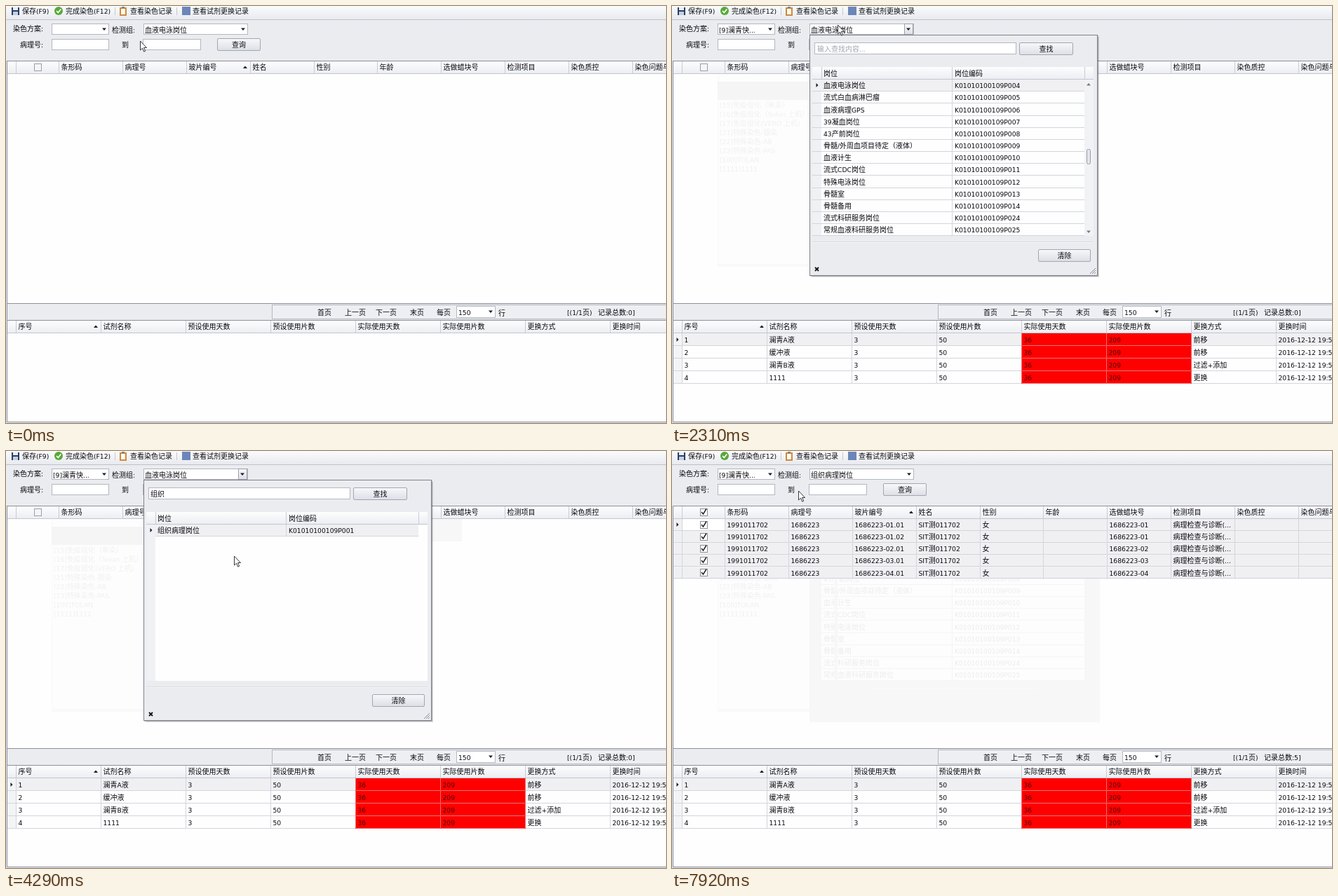
An HTML page that plays this animation: 941x595 px, repeating every 8 s.

```html
<!DOCTYPE html>
<html lang="zh-CN">
<head>
<meta charset="utf-8">
<title>染色登记</title>
<style>
html, body { margin: 0; width: 100%; height: 100%; overflow: hidden; background: #fff; }
svg { display: block; width: 941px; height: 595px; }
text { font: 10px 'Noto Sans CJK SC', 'Noto Sans CJK JP', sans-serif; fill: #08080f; white-space: pre; }
.latin { font: 9.2px 'DejaVu Sans', sans-serif; }
.ime text { font-size: 12.5px; fill: #2a4b48; }
.ime .latin { font: 12px 'Liberation Mono', monospace; }
.ime .key .latin { font: bold 12.5px 'Noto Sans', sans-serif; }
.ime .hint text { fill: #ff8212; }
.step { animation: 8000ms step-end infinite; }
</style>
</head>
<body>
<svg id="stage" viewBox="0 0 941 595">
  <defs>
    <linearGradient id="bar" x2="0" y2="1"><stop stop-color="#fafbfc"/><stop offset="1" stop-color="#e8eaef"/></linearGradient>
    <linearGradient id="head" x2="0" y2="1"><stop stop-color="#fdfdfe"/><stop offset="1" stop-color="#eceef2"/></linearGradient>
    <linearGradient id="btn" x2="0" y2="1"><stop stop-color="#f7f8fa"/><stop offset="1" stop-color="#dcdfe6"/></linearGradient>
    <linearGradient id="btnOn" x2="0" y2="1"><stop stop-color="#eaeffa"/><stop offset="1" stop-color="#c9d3ec"/></linearGradient>
    <linearGradient id="skin" x2="1" y2="0"><stop stop-color="#d3dbd0"/><stop offset=".6" stop-color="#e0e5de"/><stop offset="1" stop-color="#b9c2bb"/></linearGradient>
    <linearGradient id="mist" x2="0" y2="1"><stop stop-color="#fff" stop-opacity=".45"/><stop offset=".5" stop-color="#fff" stop-opacity=".05"/><stop offset="1" stop-color="#fff" stop-opacity=".1"/></linearGradient>
    <linearGradient id="shore" x2="1" y2="0"><stop stop-color="#6c7a73" stop-opacity="0"/><stop offset=".5" stop-color="#59665f"/><stop offset="1" stop-color="#6f7b74"/></linearGradient>
    <clipPath id="skinEdge"><rect x="211" y="71" width="448" height="58" rx="4"/></clipPath>
  </defs>
</svg>
<script>
const LOOP = 8000;
const PANEL = '#ebecef', EDGE = '#b4b7c1', DARK = '#8d909b', GRID = '#d3d5dc', TINT = '#f0f0f3', INK = '#1b1b28';
let css = '', count = 0;

const rect = (x, y, w, h, fill) => `<rect x="${x}" y="${y}" width="${w}" height="${h}" fill="${fill}"/>`;
const box = (x, y, w, h, fill, stroke = EDGE, more = '') =>
  `<rect x="${x + .5}" y="${y + .5}" width="${w - 1}" height="${h - 1}" fill="${fill}" stroke="${stroke}" ${more}/>`;
const path = (d, fill, more = '') => `<path d="${d}" fill="${fill}" ${more}/>`;
const hline = (x, y, w, c) => rect(x, y, w, 1, c);
const vline = (x, y, h, c) => rect(x, y, 1, h, c);
const text = (x, y, s, fill) => `<text x="${x}" y="${y + 3.6}"${fill ? ` style="fill:${fill}"` : ''}>` +
  s.replace(/[\x20-\x7e]+/g, m => `<tspan class="latin">${m}</tspan>`) + '</text>';
const each = (list, fn) => list.map(fn).join('');
const range = (n, from = 0) => Array.from({ length: n }, (_, i) => i + from);

const down = (x, y, c = INK) => path(`M${x - 3} ${y - 1.5}h6l-3 3.5z`, c);
const up = (x, y, c = INK) => path(`M${x - 3} ${y + 1.5}h6l-3 -3.5z`, c);
const pointer = (x, y) => path(`M${x - 1.5} ${y - 3}v6l3 -3z`, INK);
const caret = (x, y) => vline(x, y - 5, 11, '#111');
const focus = (x, w) => box(x, 26, w, 14, 'none', '#444', 'stroke-dasharray="1 1"');
const field = (x, y, w) => box(x, y, w, 16, '#fff');
const combo = (x, w) => field(x, 25, w) + down(x + w - 7, 33);
const button = (x, y, w, h, label, on) =>
  box(x, y, w, h, on ? 'url(#btnOn)' : 'url(#btn)', on ? '#44527f' : '#a3a6b1', 'rx="1.5"') +
  (on ? box(x + 2, y + 2, w - 4, h - 4, 'none', '#8f9cc4') : '') +
  text(x + w / 2 - 10, y + h / 2, label);

// Shows a part between two times of the loop.
function when(from, to, body) {
  const name = 'w' + count++, pct = t => t / LOOP * 100 + '%';
  css += `@keyframes ${name}{0%{visibility:${from ? 'hidden' : 'visible'}}${pct(from)}{visibility:visible}` +
    (to < LOOP ? `${pct(to)}{visibility:hidden}` : '') + '}';
  return `<g class="step" style="animation-name:${name}">${body}</g>`;
}

function toolbar() {
  return rect(0, 0, 941, 19, 'url(#bar)') + hline(0, 19, 941, '#bfc2cb') +
    rect(8, 2, 11, 11, '#2b3f66') + rect(10, 2, 7, 4, '#e8edf6') + rect(10, 8, 7, 5, '#c3cfe2') +
    '<circle cx="75" cy="7" r="6" fill="#58a83a"/>' + path('M72 7l2.3 2.5 4-5', 'none', 'stroke="#fff" stroke-width="1.7"') +
    rect(162, 2, 10, 12, '#d08a3c') + rect(164, 4, 6, 8, '#fbfbf6') + rect(165, 1, 4, 2, '#77808f') +
    rect(251, 1, 12, 12, '#6d86b8') +
    vline(155, 2, 11, '#c5c8d0') + vline(243, 2, 11, '#c5c8d0') +
    text(23, 7, '保存(F9)') + text(85, 7, '完成染色(F12)') + text(177, 7, '查看染色记录') + text(266, 7, '查看试剂更换记录');
}

function filters() {
  return rect(0, 20, 941, 58, PANEL) +
    text(10, 32, '染色方案:') + text(151, 34, '检测组:') + text(20, 55, '病理号:') + text(165, 55, '到') +
    combo(65, 82) + combo(196, 149) + field(65, 47, 82) + field(195, 47, 83) + button(301, 46, 62, 18, '查询') +
    when(1650, LOOP, text(67, 34, '[9]澜青快...')) + when(1650, 2310, focus(66, 66)) +
    when(0, 4950, text(198, 34, '血液电泳岗位')) + when(4950, LOOP, text(198, 34, '组织病理岗位')) +
    when(2310, 4950, box(331, 25, 13, 16, 'url(#btn)', '#9c9fab') + down(337, 33)) +
    when(4950, 5610, focus(197, 133)) +
    when(5610, 5940, caret(68, 55)) + when(5940, 6930, text(69, 55, '1686223')) + when(5940, 6600, caret(110, 55)) +
    when(6600, 7920, button(301, 46, 62, 18, '查询', true));
}

function header(y, cols, labels, sortX) {
  return rect(1, y, 940, 17, 'url(#head)') + hline(1, y + 17, 940, '#c3c6ce') +
    each(cols, x => vline(x, y, 17, '#c9ccd4')) +
    each(labels, (s, i) => text(cols[i + cols.length - labels.length] + 3.5, y + 8.5, s)) + up(sortX, y + 8.5);
}

const topCols = [14, 75, 166, 257, 348, 439, 529, 620, 711, 802, 893];
const lowCols = [14, 135, 256, 377, 498, 619, 740, 861];
const check = (x, y) => box(x - 5, y - 5, 11, 11, '#fff', '#8b8e9a') +
  path(`M${x - 3} ${y}l2.5 3 4.5 -7.5`, 'none', 'stroke="#222" stroke-width="1.5"');

function samples() {
  const ids = ['01.01', '01.02', '02.01', '03.01', '04.01'];
  return each(ids, (id, i) => {
    const y = 97 + i * 17.1, c = y + 8.5, base = '1686223';
    const cells = ['1991011702', base, base + '-' + id, 'SIT测011702', '女', '', base + '-' + id.slice(0, 2), '病理检查与诊断(...'];
    return rect(2, y, 939, 17.1, TINT) + (i ? '' : rect(15, y, 60, 16, '#fff')) + hline(2, Math.round(y + 16), 939, GRID) +
      each(topCols, x => vline(x, y, 17.1, GRID)) + check(45, Math.round(c - 1)) +
      each(cells, (s, j) => text(topCols[j + 1] + 3.5, c, s));
  }) + pointer(8, 105) + check(45, 87);
}

function reagents() {
  const rows = [['澜青A液', '前移'], ['缓冲液', '前移'], ['澜青B液', '过滤+添加'], ['1111', '更换']];
  const edges = each(rows, (_, i) => hline(498, 484 + i * 18, 243, '#f007')) + each([498, 619, 740], x => vline(x, 467, 72, '#f007'));
  return each(rows, ([name, mode], i) => {
    const y = 467 + i * 18, cells = [i + 1 + '', name, '3', '50', '36', '209', mode, '2016-12-12 19:56'];
    return rect(2, y, 939, 18, i ? '#fefefe' : TINT) + rect(2, y, 12, 18, '#f3f4f6') + hline(2, y + 17, 939, GRID) +
      each(lowCols, x => vline(x, y, 18, GRID)) + rect(499, y, 120, 17, '#f00') + rect(620, y, 120, 17, '#f00') +
      each(cells, (s, j) => text(lowCols[j] + 3.5, y + 9, s, j == 4 || j == 5 ? '#4a0606' : ''));
  }) + edges + pointer(8, 476);
}

function pager() {
  const words = [[444, '首页'], [483, '上一页'], [527, '下一页'], [576, '末页'], [614, '每页'], [800, '[(1/1页)']];
  return hline(1, 424, 940, DARK) + rect(1, 425, 940, 24, PANEL) + box(379, 426, 570, 21, '#eeeff2') +
    each(words, ([x, s]) => text(x, 437, s)) + box(642, 428, 56, 17, '#fff') + text(645, 437, '150') + down(691, 436) + text(702, 438, '行') +
    when(0, 7260, text(844, 437, '记录总数:0]')) + when(7260, LOOP, text(844, 437, '记录总数:5]'));
}

const plans = ['[1]常规染色', '[3]巴氏染色', '[4]瑞氏染色', '[5]姬氏染色', '[7]快速染色(手工)', '[8]液基薄层', '[9]澜青快速染色液',
  '[15]免疫组化（单染）', '[16]免疫组化（Solan 上机）', '[17]免疫组化(VERO 上机)', '[21]特殊染色-银染', '[22]特殊染色-AB',
  '[23]特殊染色-PAS', '[100]TOLAN', '[1111]1111'];
const planText = (k, fill) => text(68, 50 + 13 * k, plans[k], fill);

function planList() {
  const mark = (from, to, k) => when(from, to, rect(66, 43.5 + 13 * k, 166, 13, '#d3d8e4'));
  return when(660, 1650, rect(68, 44, 168, 328, '#0002') + box(65, 41, 168, 328, '#fff', DARK)) +
    mark(660, 990, 3) + mark(990, 1320, 5) + mark(1320, 1650, 6) +
    when(660, 1650, each(range(plans.length), k => planText(k)));
}

const posts = ['血液电泳岗位', '流式白血病淋巴瘤', '血液病理GPS', '39凝血岗位', '43产前岗位', '骨髓/外周血项目待定（液体）', '血液计生',
  '流式CDC岗位', '特殊电泳岗位', '骨髓室', '骨髓备用', '流式科研服务岗位', '常规血液科研服务岗位'];
const ROW = 17.18;
const postCode = i => 'K01010100109P' + String(i < 11 ? i + 4 : i + 13).padStart(3, '0');
const postRow = (i, name, code, fill, line = GRID) => {
  const y = 105 + i * ROW;
  return hline(213, Math.round(y + 16.2), 375, line) + text(216, y + 8.6, name, fill) + text(403, y + 8.6, code, fill);
};

function postPopup() {
  const frame = rect(199, 44, 410, 343, '#0002') + rect(197, 42, 411, 344, '#0003') + box(196, 41, 411, 344, PANEL, '#7f828d') +
    box(203, 52, 288, 17, '#fff') + button(495, 52, 77, 18, '查找') +
    rect(200, 87, 401, 241, '#fefefe') + rect(200, 87, 401, 17, 'url(#head)') + hline(200, 104, 401, '#c3c6ce') +
    rect(200, 105, 13, 223, '#f0f1f4') + rect(213, 105, 375, 16, TINT) + pointer(207, 113) +
    text(216, 96, '岗位') + text(403, 96, '岗位编码') + each([213, 399, 588], x => vline(x, 87, 17, '#c9ccd4')) +
    hline(200, 336, 401, '#d8dae0') + hline(200, 337, 401, '#f6f7f9') + button(522, 347, 75, 18, '清除') +
    path('M204 373l5 5m0 -5l-5 5', 'none', 'stroke="#111" stroke-width="1.8"') +
    path('M596 382l8 -8m-5 8l5 -5m-2 5l2 -2', 'none', 'stroke="#888b95"');
  const full = each(posts, (s, i) => postRow(i, s, postCode(i)) + hline(200, Math.round(121.2 + i * ROW), 13, GRID)) +
    vline(399, 105, 223, GRID) + rect(588, 105, 13, 223, '#f1f2f5') + up(594, 112, '#777a85') +
    down(594, 322, '#777a85') + box(591, 204, 6, 22, '#e3e5ea', '#9a9da8', 'rx="2"');
  return when(2310, 4950, frame) + when(2310, 3960, full) +
    when(3960, 4950, postRow(0, '组织病理岗位', 'K01010100109P001') + vline(399, 105, 17, GRID)) +
    when(2310, 2970, text(207, 61, '输入查找内容...', '#a2a5ae')) +
    when(3630, 4950, text(206, 61, '组织')) + when(3630, 3960, caret(227, 61));
}

function inputMethod() {
  const scene = path('M520 112Q550 98 570 101T612 94T659 86V126H540Z', '#a9b5ae', 'opacity=".6"') +
    path('M628 118Q626 100 636 94Q642 82 659 78V129H628Z', '#8b968f', 'opacity=".75"') +
    path('M540 124Q575 114 610 115T659 108V129H540Z', 'url(#shore)') +
    path('M584 96Q598 93 606 81Q614 93 629 96L623 99H590Z M592 98h2v17h-2z M602 98h2v17h-2z M610 98h2v17h-2z M618 98h2v17h-2z M588 110h36v5h-36z', '#3f4a44') +
    path('M560 81l3 1 3 -2M568 85l3 1 3 -2M563 88l2 1 3 -2M572 79l2 1 2 -1', 'none', 'stroke="#46524d"');
  const panel = box(213, 73, 447, 57, '#0003', 'none', 'rx="4"') +
    `<g clip-path="url(#skinEdge)">${rect(211, 71, 448, 58, 'url(#skin)') + rect(211, 71, 448, 58, 'url(#mist)') + scene}</g>` +
    box(211, 71, 448, 58, 'none', '#9eaaa3', 'rx="4"') +
    hline(218, 101, 345, '#b6c2ba') + hline(218, 102, 345, '#eef2ee') +
    path('M558 112v7l-4 -3.5z', '#97a59e') + path('M563 111v9l5 -4.5z', '#1e4a45');
  const typed = (key, hintX, words, gap) => `<g class="key">${text(222, 88, key)}<g class="hint">${text(hintX, 88, `[${key}]`)}</g></g>` +
    caret(222 + key.length * 6.8, 88) + each(words, (w, i) => text(222 + i * gap, 115, i + 1 + '.' + w));
  return '<g class="ime">' + when(2970, 3630, panel) +
    when(2970, 3300, typed('zu', 267, [...'组租足族祖阻卒诅镞'], 36.75)) +
    when(3300, 3630, typed('zuzhi', 289, ['组织', '足智', '阻止', '组', '租', '足', '族'], 46)) + '</g>';
}

// Faint remains of closed lists on the empty grid.
function remains() {
  const plan = rect(65, 97, 171, 275, '#f9f9f9') + rect(66, 97, 166, 271, '#fdfdfd') + rect(65, 108, 167, 26, '#f5f5f5') +
    each(range(8, 7), k => planText(k, '#f0f0f0'));
  const post = rect(196, 97, 414, 290, '#f7f7f7') + rect(213, 138, 375, 190, '#fdfdfd') +
    each(range(11, 2), i => postRow(i, posts[i], postCode(i), '#ececec', '#f5f5f5')) +
    vline(399, 138, 190, '#f5f5f5') + rect(232, 138, 4, 190, '#f7f7f7') + hline(281, 338, 240, '#fbfbfb');
  return when(1650, LOOP, plan) + when(3630, LOOP, rect(607, 97, 43, 32, '#f7f7f7')) + when(4950, LOOP, post);
}

function cursor() {
  const stops = [[0, 191, 50], [330, 114, 31], [660, 150, 84], [990, 150, 114], [1320, 147, 121], [1650, 212, 60], [1980, 236, 27],
    [4290, 325, 150], [4620, 260, 109], [5280, 137, 75], [5610], [5940, 261, 82], [6270, 303, 62], [7590, 186, 58], [7920, 180, 57], [LOOP]];
  const arrow = (x, y) => path(`M${x + .5} ${y}v13l3 -2.8 2.2 5 2 -1 -2.2 -4.7h4z`, '#fff', 'stroke="#222" stroke-width=".9"');
  const beam = path('M98 49.5h5m-2.5 0v12m-2.5 0h5', 'none', 'stroke="#222"');
  return each(stops.slice(0, -1), ([t, x, y], i) => when(t, stops[i + 1][0], x ? arrow(x, y) : beam));
}

const topLabels = ['条形码', '病理号', '玻片编号', '姓名', '性别', '年龄', '选做蜡块号', '检测项目', '染色质控', '染色问题与建议'];
const lowLabels = ['序号', '试剂名称', '预设使用天数', '预设使用片数', '实际使用天数', '实际使用片数', '更换方式', '更换时间'];

stage.innerHTML += rect(0, 0, 941, 595, PANEL) + toolbar() + filters() +
  rect(1, 78, 940, 516, '#fefefe') + hline(1, 78, 940, DARK) + remains() +
  header(79, topCols, topLabels, 341) + box(40, 82, 11, 11, '#f4f5f7', '#9a9da8') +
  when(7260, LOOP, samples()) + pager() +
  hline(1, 448, 940, DARK) + header(449, lowCols, lowLabels, 128) + when(1650, LOOP, reagents()) +
  vline(1, 78, 516, DARK) + hline(1, 593, 940, DARK) +
  planList() + postPopup() + inputMethod() + cursor();
document.head.appendChild(document.createElement('style')).textContent = css;
</script>
</body>
</html>
```
